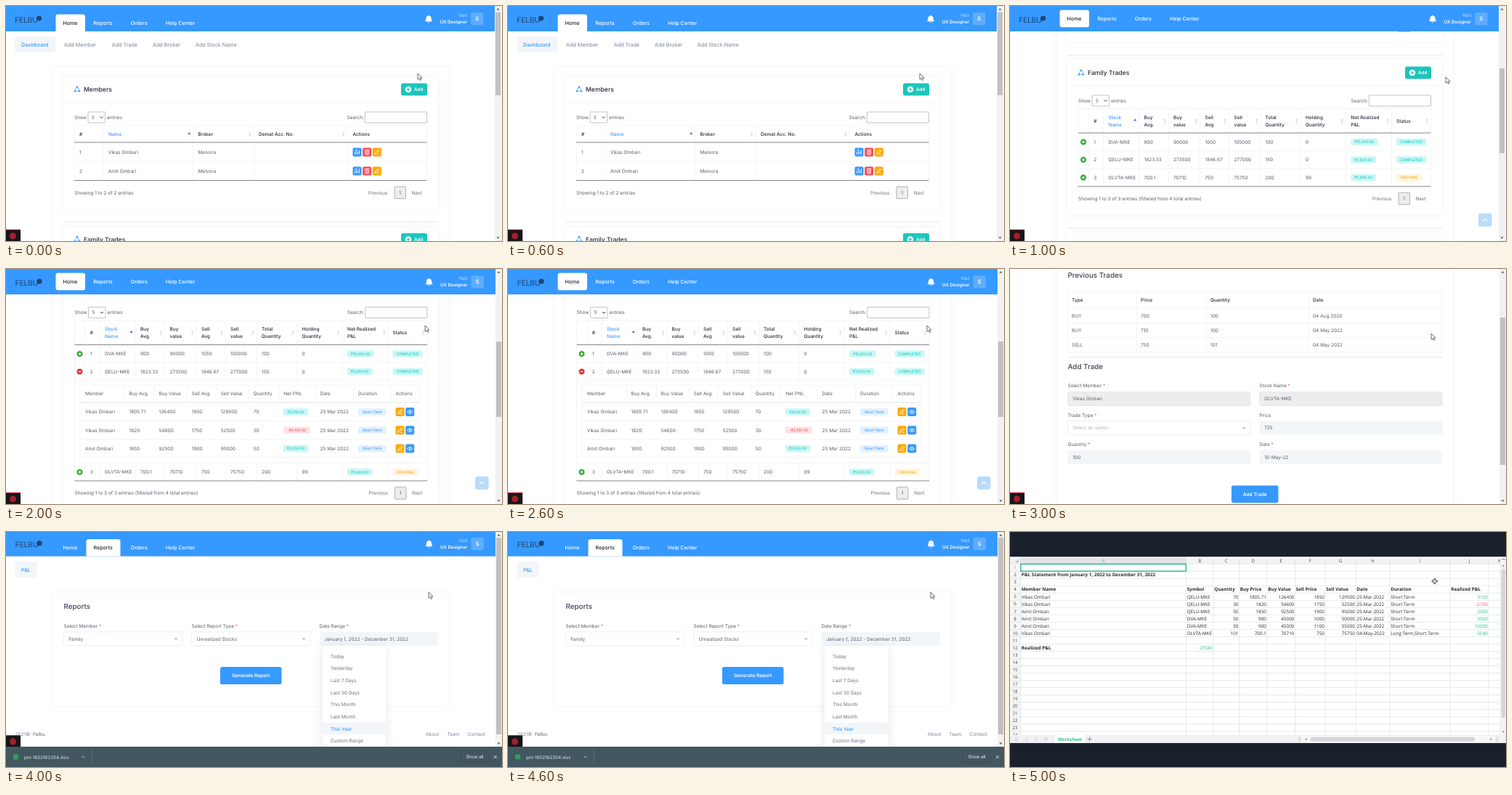
These frames come from a looping animation (683x324 px, 6000 ms). An HTML page:

```html
<!DOCTYPE html>
<html lang="en">
<head>
<meta charset="utf-8">
<title>Portfolio dashboard tour</title>
<style>
html, body { margin: 0; width: 100%; height: 100%; overflow: hidden; background: #fff; }
svg { display: block; width: 100%; height: 100%; font-family: Inter, sans-serif; text-rendering: geometricPrecision; }
.scene { visibility: hidden; animation: show 6s step-end infinite; }
.card { filter: drop-shadow(0 0 5px rgba(82, 63, 105, .05)); }
.menu { filter: drop-shadow(0 2px 6px rgba(82, 63, 105, .15)); }
.sheet { font-family: "Open Sans", sans-serif; }
.logo { font-family: Lato, sans-serif; }
@keyframes show { 0% { visibility: visible } 16.6666%, 100% { visibility: hidden } }
</style>
</head>
<body>
<svg id="stage" viewBox="0 0 683 324" preserveAspectRatio="none"></svg>
<script>
const INK = '#5a5d69', DARK = '#24283c', MUTED = '#7e8299', BLUE = '#3699ff', TEAL = '#1bc5bd',
  RED = '#f64e60', ORANGE = '#ffa800', LINE = '#e6e8ee', FIELD = '#f3f6f9', WHITE = '#fff';
const TINT = { [TEAL]: '#c9f7f5', [RED]: '#ffe2e5', [ORANGE]: '#fff4de', [BLUE]: '#e1f0ff' };
const FIRST = 'Vikas Ombari', SECOND = 'Amit Ombari';

// Primitives; the y of a text is the middle of its capitals.
const text = (x, y, s, { size = 6.5, fill = INK, weight = 400, anchor = 'start', cls = '' } = {}) =>
  `<text x="${x}" y="${y + size * .36}" font-size="${size}" fill="${fill}" font-weight="${weight}" ` +
  `text-anchor="${anchor}" class="${cls}">${String(s).replace(/&/g, '&amp;')}</text>`;
const rect = (x, y, w, h, fill, { r = 0, stroke = 'none', sw = .5, cls = '' } = {}) =>
  `<rect x="${x}" y="${y}" width="${w}" height="${h}" rx="${r}" fill="${fill}" stroke="${stroke}" stroke-width="${sw}" class="${cls}"/>`;
const path = (d, fill, stroke = 'none', sw = 1) =>
  `<path d="${d}" fill="${fill}" stroke="${stroke}" stroke-width="${sw}" stroke-linejoin="round"/>`;
const stroke = (d, color, sw = .5) => path(d, 'none', color, sw);
const circle = (x, y, r, fill, edge = 'none') => `<circle cx="${x}" cy="${y}" r="${r}" fill="${fill}" stroke="${edge}"/>`;
const move = (x, y, s) => `<g transform="translate(${x} ${y})">${s}</g>`;
const each = (list, fn) => list.map(fn).join('');
const hLines = (x1, x2, ys, color = LINE, sw) => each(ys, y => stroke(`M${x1} ${y}H${x2}`, color, sw));
const vLines = (y1, y2, xs, color = LINE, sw) => each(xs, x => stroke(`M${x} ${y1}V${y2}`, color, sw));
const cells = (xs, y, values, style) => each(values, (v, i) => text(xs[i], y, v, style));
const triangle = (x, y, w, h, fill) => path(`M${x - w} ${y}h${2 * w}l${-w} ${-h}z`, fill);
const plus = (x, y, r, color, sw = 1) => stroke(`M${x - r} ${y}h${2 * r}M${x} ${y - r}v${2 * r}`, color, sw);
const chevron = (x, y, color = '#555', h = 2) => stroke(`M${x - 2} ${y - h / 2}l2 ${h}l2 ${-h}`, color, .9);

const card = (x, y, w, h) => rect(x, y, w, h, WHITE, { r: 3, stroke: '#f3f3f6', cls: 'card' });
const outerCard = (y, h) => card(65, y, 545, h);
const divider = y => stroke(`M79 ${y}H595`, '#dedfe4', .7);
const cursor = (x, y) => move(x, y, path('M0 0V8.2L2 6.5L3.4 9.5L4.8 8.8L3.5 6H6z', WHITE, '#333', .7));
const badge = (x, y, w, s, color) => rect(x, y - 4.8, w, 9.6, TINT[color], { r: 2 }) +
  text(x + w / 2, y, s, { size: 5, fill: color, weight: 500, anchor: 'middle' });
const recorder = (y = 308) => rect(0, y, 20, 16, '#16161a') + rect(0, y, 20, 1, '#e0203a') + circle(9.5, y + 9, 4.5, '#a3202d');

function scrollbar(x, top, bottom, end = 324) {
  return rect(x, 0, 9, end, '#f1f1f1') + rect(x + 1, top, 7, bottom - top, '#c1c1c1') +
    triangle(x + 4.5, 5.5, 2, 2.5, '#555') + triangle(x + 4.5, end - 5.5, 2, -2.5, '#555');
}

const TABS = [['Home', 78.5, 20.5], ['Reports', 120.5, 27], ['Orders', 171.7, 25], ['Help Center', 220, 42]];
function nav({ active = 0, y = 17, pill = true, height = 35, shift = 0, lift = 0 }) {
  const [, x, w] = TABS[active];
  const tab = pill ? rect(x - 10, y - 11.5, w + 20, 23.7, WHITE, { r: 3 })
    : path(`M${x - 10} ${height}V${y - 8.5}q0-3 3-3h${w + 14}q3 0 3 3V${height}z`, WHITE);
  const bell = path('M-5 3.2Q-3.5 2-3.5-1.2Q-3.5-4-.8-4.5Q0-6.4.8-4.5Q3.5-4 3.5-1.2Q3.5 2 5 3.2zM-1.5 4.2h3q-1.5 2-3 0', WHITE);
  return rect(0, 0, 673 + shift, height, BLUE) + tab +
    each(TABS, ([s, tx], i) => text(tx, y, s, { size: 7.1, weight: 500, fill: i === active ? '#222' : WHITE })) +
    move(shift / 2, -lift,
      text(12, 19, 'FELBU', { size: 10.5, fill: '#1d4673', cls: 'logo' }) + circle(45.5, 17, 3.6, '#1d4673') +
      move(582, 18, bell) +
      text(635, 13, 'Neil', { fill: '#b9dcff', anchor: 'end' }) +
      text(635, 21.7, 'UX Designer', { size: 6.2, fill: WHITE, weight: 600, anchor: 'end' }) +
      rect(640, 9, 17.5, 17.5, '#5eadff', { r: 2.5 }) +
      text(648.7, 17.5, 'S', { size: 7.5, fill: WHITE, weight: 600, anchor: 'middle' }));
}

function cardHead(y, title) {
  return stroke(`M98 ${y - 4}l3.6 6.5h-7.2z`, '#7fbcff', 1.2) + circle(98, y - 3.4, 1.2, BLUE) +
    circle(95, y + 2.4, 1.2, BLUE) + circle(101, y + 2.4, 1.2, BLUE) +
    text(107, y, title, { size: 8.6, weight: 500, fill: DARK }) +
    rect(544, y - 8.5, 36, 17, TEAL, { r: 2.5 }) + circle(554, y, 4.3, WHITE) + plus(554, y, 2.3, TEAL, 1.2) +
    text(562, y, 'Add', { weight: 600, fill: WHITE, size: 6.3 });
}

function controls(y) {
  const edge = { r: 1, stroke: '#9a9a9a', sw: .6 };
  return text(94, y, 'Show') + rect(113, y - 7.5, 23.5, 15, WHITE, edge) + text(118, y, '5') +
    chevron(131.5, y, '#222') + text(139, y, 'entries') +
    text(493, y, 'Search:', { anchor: 'end' }) + rect(494.3, y - 7.5, 85.2, 15, WHITE, edge);
}

function pager(y, info) {
  return text(94, y, info) + text(499, y, 'Previous', { fill: '#6c6f7a' }) +
    rect(535, y - 8.3, 15.5, 16.6, '#ededed', { r: 1, stroke: '#979797', sw: .7 }) +
    text(542.7, y, '1', { anchor: 'middle' }) + text(558.5, y, 'Next', { fill: '#6c6f7a' });
}

const sorter = (x, y, active) => active ? triangle(x, y, 2.2, 3.2, '#5a78f0')
  : triangle(x, y - .7, 1.8, 2.4, '#cfd2da') + triangle(x, y + .7, 1.8, -2.4, '#cfd2da');

// Small square action buttons.
const GLYPHS = {
  chart: [BLUE, 'M-3 3V0M-1 3V-2M1 3V-1M3 3V-3M-3-2L0-4'],
  trash: [RED, 'M-3.2-3h6.4M-2.4-1.2l.5 4.4h3.8l.5-4.4zM-1 0l2 2M1 0l-2 2'],
  pen: [ORANGE, 'M-3 3l.6-2.2L1.8-3.2L3.2-1.8L-.9 2.4zM.8 3.2H3'],
  eye: [BLUE, 'M-3.6 0Q0-4.4 3.6 0Q0 4.4-3.6 0zM-.8 0a.8.8 0 1 0 1.6 0a.8.8 0 1 0-1.6 0']
};
const action = (x, y, kind) => rect(x - 6, y - 6, 12, 12, GLYPHS[kind][0], { r: 2 }) +
  move(x, y, stroke(GLYPHS[kind][1], WHITE, .9));
const expander = (y, open) => circle(101, y, 4.2, open ? '#d33333' : '#31a531', open ? '#f0c4c4' : '#c2e2c2') +
  (open ? stroke(`M99.2 ${y}h3.6`, WHITE, 1.4) : plus(101, y, 1.8, WHITE, 1.4));
const toTop = x => rect(x, 286, 18.5, 18, '#b9dbfb', { r: 3 }) + stroke(`M${x + 6} 296.5l3.2-3.2l3.2 3.2`, WHITE, 1.2);

const TRADE_COLS = [115.3, 135.5, 184.5, 225, 268.5, 308.5, 351.5, 407, 469.5, 532];
const TRADE_EDGES = [94, 108.5, 128.5, 177.5, 218.5, 261.5, 301.5, 345, 400, 462.5, 525.5, 579.5];
const TRADE_HEADS = ['#', 'Stock|Name', 'Buy|Avg.', 'Buy|value', 'Sell|Avg', 'Sell|value', 'Total|Quantity',
  'Holding|Quantity', 'Net Realized|P&L', 'Status'];
const TRADES = [
  ['1', 'DVA-MKE', '900', '90000', '1050', '105000', '100', '0', '₹15,000.00'],
  ['2', 'QELU-MKE', '1823.33', '273500', '1846.67', '277000', '150', '0', '₹3,500.00'],
  ['3', 'OLVTA-MKE', '700.1', '70710', '750', '75750', '200', '99', '₹5,040.00']
];
function tradeHead(y) {
  return vLines(y - 17, y + 16.5, TRADE_EDGES) + hLines(94, 579.5, [y - 17]) + hLines(94, 579.5, [y + 16.5], '#666', .8) +
    each(TRADE_HEADS, (head, i) => {
      const parts = head.split('|');
      return each(parts, (s, k) => text(TRADE_COLS[i], y + (k - (parts.length - 1) / 2) * 10.2, s,
        { weight: 500, fill: i === 1 ? BLUE : DARK })) +
        (i ? sorter(TRADE_EDGES[i + 2] - 5.3, y, i === 1) : '');
    });
}
function tradeRow(i, y, open) {
  const values = TRADES[i], done = i < 2;
  return expander(y, open) + cells(TRADE_COLS, y, values.slice(0, 8)) +
    badge(469.5, y, i ? 34.5 : 36.5, values[8], TEAL) +
    badge(532, y, done ? 41 : 35, done ? 'COMPLETED' : 'ONGOING', done ? TEAL : ORANGE) +
    vLines(y - 12.3, y + 12.3, TRADE_EDGES);
}

function members() {
  const subs = [['Add Member', 80], ['Add Trade', 145.7], ['Add Broker', 202], ['Add Stock Name', 260.7]];
  const cols = [101, 141, 264.5, 348, 477.5];
  const row = (y, n, name) => cells(cols, y, [n, name, 'Melvora']) +
    each(['chart', 'trash', 'pen'], (kind, i) => action(483.5 + 13.6 * i, y, kind));
  return nav({ y: 23, pill: false }) + rect(12, 42, 56, 22, FIELD, { r: 3 }) +
    text(21, 53, 'Dashboard', { size: 7.2, weight: 500, fill: BLUE }) +
    each(subs, ([s, x]) => text(x, 53, s, { size: 7.2, fill: MUTED })) +
    outerCard(84, 260) + card(79, 97, 516, 184) + cardHead(115, 'Members') + hLines(79, 595, [133]) + controls(153.5) +
    vLines(165, 240, [94, 134, 257.5, 341, 470, 579.5]) + hLines(94, 579.5, [165, 214]) +
    hLines(94, 579.5, [188, 240.5], '#666', .8) +
    cells(cols, 176.5, ['#', '', 'Broker', 'Demat Acc. No.', 'Actions'], { weight: 500, fill: DARK }) +
    text(141, 176.5, 'Name', { weight: 500, fill: BLUE }) +
    sorter(252.3, 177, true) + sorter(335.7, 177) + sorter(464.8, 177) +
    row(201.5, '1', FIRST) + row(227.5, '2', SECOND) + pager(257.3, 'Showing 1 to 2 of 2 entries') +
    divider(297.8) + card(79, 305, 516, 40) + cardHead(321.7, 'Family Trades') +
    scrollbar(673, 8.5, 123) + recorder() + cursor(567, 93);
}

const TRADE_INFO = 'Showing 1 to 3 of 3 entries (filtered from 4 total entries)';

function familyTrades() {
  return outerCard(0, 340) + card(79, 0, 516, 50) + rect(535, 30, 15.5, 5.5, '#ededed', { stroke: '#979797' }) +
    nav({}) + divider(68) + card(79, 73.5, 516, 215) + cardHead(92, 'Family Trades') + hLines(79, 595, [110]) +
    controls(130.5) + tradeHead(158.5) + each([0, 1, 2], i => tradeRow(i, 187.5 + 24.5 * i)) +
    hLines(94, 579.5, [200, 224.5]) + hLines(94, 579.5, [248.8], '#666', .8) + pager(265.5, TRADE_INFO) +
    divider(306) + card(79, 312, 516, 30) + toTop(645) + scrollbar(673, 86, 203) + recorder() + cursor(600, 98);
}

function expandedTrade() {
  const cols = [108.5, 169, 210, 255.3, 295.2, 340.3, 381.7, 432, 484.5, 536];
  const heads = ['Member', 'Buy Avg.', 'Buy Value', 'Sell Avg.', 'Sell Value', 'Quantity', 'Net PNL', 'Date', 'Duration', 'Actions'];
  const lots = [
    [FIRST, '1805.71', '126400', '1850', '129500', '70', '₹3,100.00'],
    [FIRST, '1820', '54600', '1750', '52500', '30', '-₹2,100.00'],
    [SECOND, '1850', '92500', '1900', '95000', '50', '₹2,500.00']
  ];
  const lot = (values, i) => {
    const y = 197 + 25.3 * i, loss = values[6][0] === '-';
    return cells(cols, y, values.slice(0, 6)) + badge(381.5, y, loss ? 37 : 34, values[6], loss ? RED : TEAL) +
      text(432, y, '25 Mar 2022') + badge(484.5, y, 38.5, 'Short Term', BLUE) +
      action(542, y, 'pen') + action(555.7, y, 'eye');
  };
  return outerCard(0, 340) + card(79, 0, 516, 340) + nav({ shift: 1 }) + move(.5, 0,
    controls(60) + tradeHead(88) + tradeRow(0, 117) + tradeRow(1, 141.5, true) + tradeRow(2, 280) +
    hLines(94, 579.5, [129, 154, 267.5]) + vLines(154, 267, [94, 579.5]) + hLines(94, 579.5, [292], '#666', .8) +
    vLines(160, 260, [101.5, 568.5]) + vLines(160, 184, cols.slice(1).map(x => x - 6.5)) +
    hLines(101.5, 568.5, [160, 209.5, 234.8, 260]) + hLines(101.5, 568.5, [184], '#c8cad2') +
    cells(cols, 172, heads) + each(lots, lot) + pager(309, TRADE_INFO)) +
    toTop(646) + scrollbar(674, 100, 204) + recorder() + cursor(577, 78);
}

const label = (x, y, s, required = true) => `<text x="${x}" y="${y + 2.3}" font-size="6.5" fill="${INK}">${s}` +
  (required ? ` <tspan fill="${RED}">*</tspan>` : '') + '</text>';
function field(x, y, w, s, { fill = FIELD, edge = 'none', color = INK, select } = {}) {
  return rect(x, y - 9.5, w, 19, fill, { r: 2, stroke: edge, sw: .7 }) + text(x + 6.7, y, s, { fill: color }) +
    (select ? chevron(x + w - 9, y, '#777') : '');
}
const button = (x, y, w, s) => rect(x, y, w, 24, BLUE, { r: 2.5 }) +
  text(x + w / 2, y + 12, s, { weight: 600, fill: WHITE, anchor: 'middle', size: 6.6 });
const heading = (y, s) => text(79.5, y, s, { size: 9.8, weight: 500, fill: '#3f4254' });

function addTrade() {
  const cols = [85, 180, 276, 417];
  const rows = [['BUY', '700', '100', '04 Aug 2020'], ['BUY', '710', '100', '04 May 2022'], ['SELL', '750', '101', '04 May 2022']];
  const locked = { fill: '#ededee', edge: '#e2e3e6' };
  return outerCard(-10, 350) + heading(8.5, 'Previous Trades') +
    hLines(79.5, 595, [31, 54.5, 74.5, 94.5, 114.5]) + vLines(31, 114.5, [79.5, 174.5, 270, 412, 595]) +
    cells(cols, 43, ['Type', 'Price', 'Quantity', 'Date'], { weight: 600, fill: '#3f4254' }) +
    each(rows, (r, i) => cells(cols, 64.5 + 20 * i, r)) + divider(121.5) + heading(134, 'Add Trade') +
    label(79.5, 161, 'Select Member') + label(343.5, 161, 'Stock Name') +
    field(79.5, 179, 251.5, FIRST, locked) + field(343.5, 179, 251.5, 'OLVTA-MKE', locked) +
    label(79.5, 201.5, 'Trade Type') + label(343.5, 201.5, 'Price', false) +
    field(79.5, 219, 251.5, 'Select an option', { fill: WHITE, edge: '#e4e6ef', color: '#b0b2bf', select: true }) +
    field(343.5, 219, 251.5, '725') + label(79.5, 242, 'Quantity') + label(343.5, 242, 'Date') +
    field(79.5, 259.7, 251.5, '100') + field(343.5, 259.7, 251.5, '10-May-22') +
    button(305, 298.5, 64.5, 'Add Trade') + scrollbar(674, 67, 270) + recorder() + cursor(580, 89);
}

function reports() {
  const ranges = ['Today', 'Yesterday', 'Last 7 Days', 'Last 30 Days', 'This Month', 'Last Month', 'This Year', 'Custom Range'];
  const select = { fill: WHITE, edge: '#e4e6ef', select: true };
  return nav({ active: 1, y: 21.5, pill: false, height: 33.5, shift: 1, lift: 1.4 }) +
    rect(12.5, 41, 30, 22, FIELD, { r: 3 }) + text(21, 52, 'P&L', { weight: 500, fill: BLUE, size: 7 }) +
    outerCard(83, 157) + heading(102.5, 'Reports') +
    label(79.5, 129.5, 'Select Member') + label(255.5, 129.5, 'Select Report Type') + label(431.5, 129.5, 'Date Range') +
    field(79.5, 147.2, 163.5, 'Family', select) + field(255.7, 147.2, 163.5, 'Unrealized Stocks', select) +
    field(431.7, 147.2, 163, 'January 1, 2022 - December 31, 2022') + button(295, 186, 84.5, 'Generate Report') +
    text(12.5, 279, '2021©', { fill: MUTED }) + text(37, 279, 'Felbu') +
    each([['About', 578], ['Team', 607.5], ['Contact', 635.7]], ([s, x]) => text(x, 279, s, { fill: MUTED })) +
    rect(435.7, 156.7, 87.8, 145, WHITE, { r: 2, cls: 'menu' }) + rect(435.7, 262.8, 87.8, 16.7, FIELD) +
    each(ranges, (s, i) => text(447, 171.5 + 16.65 * i, s, i === 6 ? { fill: BLUE, weight: 500 } : { fill: '#6c6f80' })) +
    scrollbar(674, 8, 279, 296) + recorder(280) +
    rect(0, 296, 683, 28, '#435760') + rect(10, 306.5, 7, 7, '#2f9e5b', { r: 1 }) +
    text(25, 310.3, 'pnl-1652162354.xlsx', { fill: '#e8eaed', size: 6.3 }) + chevron(106.5, 310.3, '#d4d9dc', -2) +
    vLines(299, 321, [118], '#6a7c84', .7) + rect(626.5, 303, 38, 14.5, 'none', { r: 1.5, stroke: '#34495a', sw: .7 }) +
    text(645.5, 310.3, 'Show all', { fill: '#f2f4f5', size: 6.1, anchor: 'middle' }) +
    stroke('M671.8 308.2l4.2 4.2m0-4.2l-4.2 4.2', '#e2e6e8', .9) + cursor(582, 83);
}

function worksheet() {
  const edges = [14.5, 242.5, 280, 315.5, 354, 392.5, 434, 476, 523, 606, 659, 675];
  const rowY = n => 49.1 + 10.03 * (n - 1);
  const GREEN = '#2bbf86', size = 6.4;
  const heads = ['Member Name', 'Symbol', 'Quantity', 'Buy Price', 'Buy Value', 'Sell Price', 'Sell Value', 'Date', 'Duration', 'Realized P&L'];
  const q = 'QELU-MKE', d = 'DVA-MKE', day = '25-Mar-2022', short = 'Short Term';
  const rows = [
    [FIRST, q, 70, 1805.71, 126400, 1850, 129500, day, short, 3100],
    [FIRST, q, 30, 1820, 54600, 1750, 52500, day, short, -2100],
    [SECOND, q, 50, 1850, 92500, 1900, 95000, day, short, 2500],
    [SECOND, d, 50, 900, 45000, 1000, 50000, day, short, 5000],
    [SECOND, d, 50, 900, 45000, 1100, 55000, day, short, 10000],
    [FIRST, 'OLVTA-MKE', 101, 700.1, 70710, 750, 75750, '04-May-2022', 'Long Term,Short Term', 5040]
  ];
  const cell = (c, n, v, weight = 400) => {
    const number = typeof v === 'number';
    const fill = c === 9 && number || n === 12 && c === 1 ? (v < 0 ? '#f0504a' : GREEN) : '#2c2c2c';
    return text(number ? edges[c + 1] - 1 : edges[c] + 1.3, rowY(n), v, { size, fill, weight, anchor: number ? 'end' : 'start' });
  };
  const numbers = Array.from({ length: 24 }, (_, i) => i + 1);
  const small = (x, y, s, fill, weight) => text(x, y, s, { size: 6.2, anchor: 'middle', fill, weight });
  const arrows = 'M11.5 282.7l-2.5 3l2.5 3M8 282.7v6M24 282.7l-2.5 3l2.5 3M34.8 282.7l2.5 3l-2.5 3M46.5 282.7l2.5 3l-2.5 3M50.5 282.7v6';
  return `<g class="sheet">` + rect(0, 0, 683, 324, '#1a202c') + rect(0, 34, 683, 257, WHITE) +
    rect(0, 34, 683, 10, '#f3f3f3') + rect(14.5, 34, 228, 10, '#e2e5e4') + rect(0, 44, 14.5, 236, '#f6f6f6') +
    vLines(34, 280, edges, '#cfd5dc') + hLines(0, 675, [44, ...numbers.map(n => rowY(n) + 5)], '#cfd5dc') +
    path('M12 37v5h-5z', '#c5c5c5') +
    each([...'ABCDEFGHIJ'], (s, i) => small((edges[i] + edges[i + 1]) / 2, 39.3, s, i ? '#444' : GREEN)) +
    small(674, 39.3, 'K', '#444') + each(numbers, n => small(7, rowY(n), n, n > 1 ? '#444' : GREEN)) +
    cell(0, 2, 'P&L Statement from January 1, 2022 to December 31, 2022', 700) +
    each(heads, (s, c) => cell(c, 4, s, 700)) +
    each(rows, (r, i) => each(r, (v, c) => cell(c, 5 + i, v))) +
    cell(0, 12, 'Realized P&L', 700) + cell(1, 12, 23540) +
    rect(14.8, 44.2, 227.6, 9.8, 'none', { stroke: '#22b07d', sw: 1.3 }) +
    rect(675, 34, 8, 246, '#f3f3f3') + rect(676.5, 51, 5.5, 205, '#d3d5d8', { r: 2.5 }) +
    triangle(679.3, 47.5, 1.7, 2, '#777') + triangle(679.3, 274.5, 1.7, -2, '#777') + hLines(677, 682, [37.5], '#777', .8) +
    rect(0, 279.7, 683, 11.3, '#f0f1f2') + stroke(arrows, '#b5b8bc', .7) +
    rect(62, 279.7, 41, 11.3, WHITE) + small(82.5, 285.6, 'Worksheet', GREEN, 700) + plus(109.7, 285.6, 3, '#666', .7) +
    rect(402, 281, 265, 9.5, '#f7f7f7') + rect(413.5, 282.7, 226.5, 6, '#d3d5d8', { r: 3 }) +
    path('M408.5 284v3.4l-2-1.7zM661.5 284v3.4l2-1.7z', '#777') +
    each([398.7, 671], x => each([283.5, 285.6, 287.7], y => circle(x, y, .6, '#888'))) +
    move(584.8, 67.8, path('M-1-3.6h2v2.6h2.6v2h-2.6v2.6h-2v-2.6h-2.6v-2h2.6z', WHITE, '#222', .8)) + '</g>';
}

const scenes = [members, familyTrades, expandedTrade, addTrade, reports, worksheet];
document.getElementById('stage').innerHTML = each(scenes, (draw, i) =>
  `<g class="scene" style="animation-delay:${i - scenes.length}s">${rect(0, 0, 683, 324, WHITE)}${draw()}</g>`);
</script>
</body>
</html>
```
